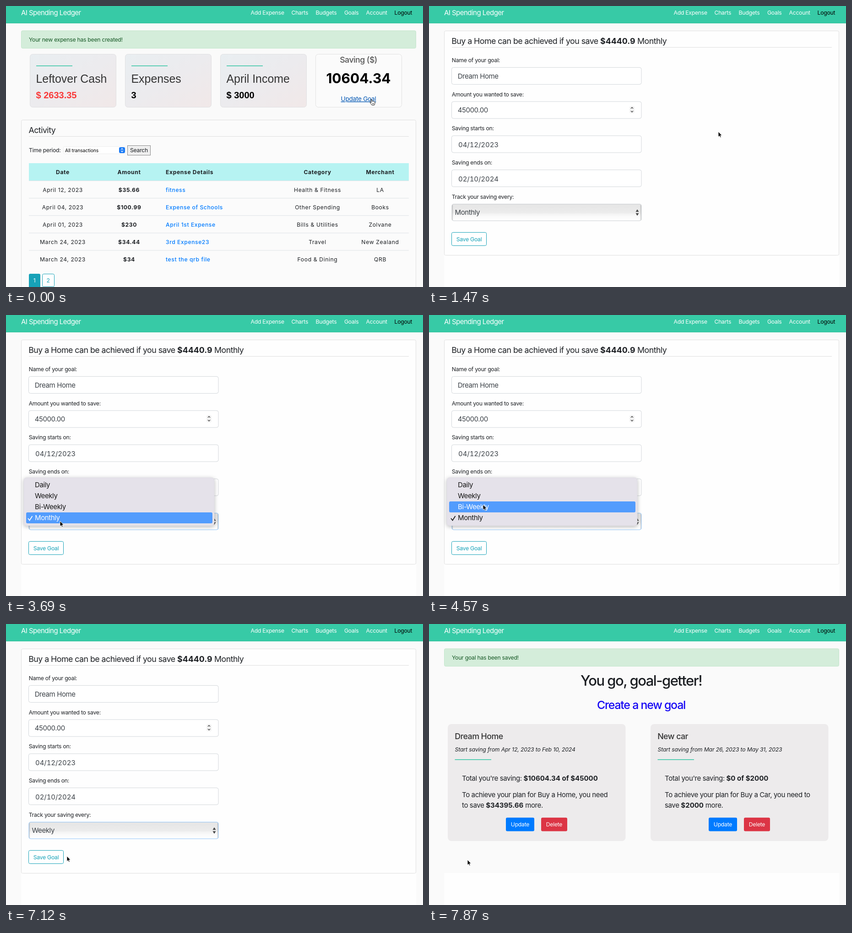
These frames come from a looping animation (911x615 px, 8000 ms). An HTML page:

```html
<!DOCTYPE html>
<html lang="en">
<head>
<meta charset="utf-8">
<title>Expense tracker</title>
<style>
  html, body { margin: 0; width: 100%; height: 100%; overflow: hidden; background: #fafafa; }
  svg { display: block; width: 911px; height: 615px; }
  text { font: 12.2px Inter, sans-serif; letter-spacing: -.02em; fill: #1c1f23; white-space: pre; }
  .bold { font-weight: 700; letter-spacing: 0; }
  .mid { text-anchor: middle; }
  .white { fill: #fff; }
  .head { font-size: 17.8px; letter-spacing: -.03em; }
  .medium { font-weight: 550; }
  .field { font-size: 15px; letter-spacing: -.027em; fill: #3b4147; }
  .date { font-size: 14.9px; letter-spacing: 0; font-variant-numeric: tabular-nums; fill: #3b4147; }
  .body { font-size: 15px; letter-spacing: -.025em; }
  .cell { letter-spacing: .6px; }
  .link { fill: #007bff; font-weight: 500; letter-spacing: .55px; }
  .alert { fill: #155724; }
  .teal { fill: #17a2b8; }
  .card { font: 24.9px "Liberation Sans", Arial, sans-serif; letter-spacing: 0; fill: #343434; }
  .value { font: bold 20px "Liberation Sans", Arial, sans-serif; letter-spacing: 0; fill: #000; }
</style>
</head>
<body>
<svg id="stage" viewBox="0 0 911 615">
  <defs>
    <linearGradient id="cardFill" x2="1" y2="1">
      <stop stop-color="#e9eef1"/><stop offset=".5" stop-color="#ecebee"/><stop offset="1" stop-color="#f1e8e8"/>
    </linearGradient>
    <linearGradient id="selectFill" x2="0" y2="1">
      <stop stop-color="#e5e5e5"/><stop offset=".52" stop-color="#ececec"/>
      <stop offset=".6" stop-color="#f4f4f4"/><stop offset=".75" stop-color="#fafafa"/><stop offset="1" stop-color="#fff"/>
    </linearGradient>
    <filter id="shadow" x="-5%" y="-15%" width="110%" height="135%">
      <feDropShadow dx="0" dy="2" stdDeviation="4" flood-opacity=".28"/>
    </filter>
  </defs>
</svg>
<script>
const LOOP = 8000;
const GREEN = '#2fc4a2', TEAL = '#17a2b8';
const stage = document.getElementById('stage');

const text = (x, y, str, cls = '', attrs = '') =>
  `<text x="${x}" y="${y}" class="${cls}" ${attrs}>${str.replace(/&/g, '&amp;')}</text>`;
const bold = str => `<tspan class="bold">${str}</tspan>`;
const box = (x, y, w, h, r, fill, stroke = 'none', attrs = '') =>
  `<rect x="${x}" y="${y}" width="${w}" height="${h}" rx="${r}" fill="${fill}" stroke="${stroke}" ${attrs}/>`;
const line = (x, y, w, color, weight = 1) =>
  `<path d="M${x} ${y}h${w}" stroke="${color}" stroke-width="${weight}"/>`;
const group = (id, content) => `<g id="${id}">${content}</g>`;
const alertBar = str => box(33.5, 54, 862, 38.5, 3, '#d4edda', '#c3e6cb') + text(50, 78, str, 'alert');
const chevrons = (x, y, w, gap, color) =>
  `<path d="M${x - w} ${y - gap}l${w} ${-w} ${w} ${w}m${-2 * w} ${2 * gap}l${w} ${w} ${w} ${-w}" fill="none" stroke="${color}" stroke-width="1.3"/>`;

function navBar() {
  const links = [[534.5, 'Add Expense'], [623.5, 'Charts'], [676.5, 'Budgets'], [739, 'Goals'], [786.5, 'Account']];
  return box(0, 0, 911, 38, 0, '#37caa6') + line(0, 37.5, 911, '#34c29f') +
    text(33, 20, 'AI Spending Ledger', 'white', 'style="font-size:15px;letter-spacing:-.035em"') +
    links.map(([x, label]) => text(x, 19.2, label, 'white')).join('') +
    text(848.5, 19.2, 'Logout', '', 'style="fill:#000"');
}

function summaryCard(x, title, value, color = '#000') {
  return box(x + .5, 105.5, 188, 116, 6, 'url(#cardFill)', '#e0e0e2') +
    line(x + 14, 131, 79, GREEN, 1.5) +
    text(x + 13.5, 168, title, 'card') +
    text(x + 13.5, 202, value, 'value', `style="fill:${color}"`);
}

function tableRow(y, [date, amount, details, category, merchant], header) {
  const weight = header ? 'cell bold' : 'cell', spacing = 'style="letter-spacing:.6px"';
  return text(124, y, date, weight + ' mid', spacing) +
    text(269, y, amount, 'cell bold mid', spacing) +
    text(349, y, details, header ? weight : 'link', header ? spacing : '') +
    text(680.5, y, category, weight + ' mid', spacing) +
    text(817.5, y, merchant, weight + ' mid', spacing);
}

function dashboard() {
  const rows = [
    ['April 12, 2023', '$35.66', 'fitness', 'Health & Fitness', 'LA'],
    ['April 04, 2023', '$100.99', 'Expense of Schools', 'Other Spending', 'Books'],
    ['April 01, 2023', '$230', 'April 1st Expense', 'Bills & Utilities', 'Zolvane'],
    ['March 24, 2023', '$34.44', '3rd Expense23', 'Travel', 'New Zealand'],
    ['March 24, 2023', '$34', 'test the qrb file', 'Food & Dining', 'QRB'],
  ];
  return alertBar('Your new expense has been created!') +
    summaryCard(52, 'Leftover Cash', '$ 2633.35', '#f93a3a') +
    summaryCard(260, 'Expenses', '3') +
    summaryCard(468, 'April Income', '$ 3000') +
    box(676.5, 105.5, 188, 116, 6, '#fbfbfb', '#e2e2e2') +
    text(770, 123.5, 'Saving ($)', 'head medium mid', 'style="fill:#555"') +
    text(770, 168.5, '10604.34', 'bold mid', 'style="font-size:30px;fill:#000"') +
    text(770, 208, 'Update Goal', 'mid', 'style="font-size:13.6px;fill:#0056b3;text-decoration:underline"') +
    box(33.5, 249.5, 862, 380, 3, '#fbfbfb', '#dfdfdf') +
    text(49.5, 278, 'Activity', 'head') + line(50, 285.5, 830, '#dedede') +
    text(50, 320, 'Time period:') +
    box(125.5, 307.5, 136, 16, 3, '#fff', '#eee') +
    text(129, 320, 'All transactions', '', 'style="font-size:10.3px;letter-spacing:-.01em;fill:#000"') +
    box(247, 309, 13, 13, 3, '#1a7af5') + chevrons(253.5, 315.5, 2.3, 1.3, '#fff') +
    box(265.5, 305.5, 50, 21, 0, '#efefef', '#8a8a8a') + text(290.5, 320, 'Search', 'mid') +
    box(50, 344, 830, 38.5, 0, '#b6f3f2') +
    tableRow(367.5, ['Date', 'Amount', 'Expense Details', 'Category', 'Merchant'], true) +
    rows.map((row, i) => line(50, 382.5 + 38.1 * i, 830, '#dee2e6') + tableRow(406.5 + 38 * i, row)).join('') +
    box(50, 586, 25, 32, 3, TEAL) + text(62, 605, '1', 'mid white') +
    box(79.5, 586.5, 26, 28, 3, '#fff', TEAL) + text(92, 605, '2', 'mid teal');
}

function goalForm() {
  const field = (i, label, value, cls) => {
    const [x, y] = cls === 'date' ? [64, 159.7] : [62.7, 158.7];
    return text(49.7, 123 + 74.7 * i, label) +
      box(49.5, 134.5 + 74.7 * i, 414.5, 37, 4, '#fff', '#d3d7db') +
      text(x, y + 74.7 * i, value, cls);
  };
  return box(33, 545, 863, 70, 0, '#fefefe') +
    box(33.5, 54.5, 862, 491, 3, '#fefefe', '#dfdfdf') +
    text(49.2, 83, `Buy a Home can be achieved if you save ${bold('$4440.9')} Monthly`, 'head') +
    line(50, 90.5, 830, '#dedede') +
    field(0, 'Name of your goal:', 'Dream Home', 'field') +
    field(1, 'Amount you wanted to save:', '45000.00', 'field') +
    box(438, 219, 11, 16, 4, '#f3f3f3') + chevrons(443.5, 227, 2.5, 2.6, '#333') +
    field(2, 'Saving starts on:', '04/12/2023', 'date') +
    field(3, 'Saving ends on:', '02/10/2024', 'date') +
    text(49.7, 422, 'Track your saving every:') +
    box(50, 433.5, 414, 36.5, 4, 'url(#selectFill)', '#c9cdd1', 'id="select"') +
    '<path d="M51.3 436v32M462.6 436v32" stroke="#000" stroke-opacity=".13" stroke-width="2"/>' +
    '<path d="M451.5 450.5l3.5-5.5 3.5 5.5zm0 3l3.5 5.5 3.5-5.5z" fill="#444"/>' +
    text(56.5, 457.3, 'Monthly', 'field', 'id="choice"') +
    box(49.5, 495.5, 76, 29, 3, '#fff', TEAL, 'id="save"') +
    text(87.5, 515, 'Save Goal', 'mid', 'id="saveLabel"');
}

const periods = ['Daily', 'Weekly', 'Bi-Weekly', 'Monthly'];
const MENU_TOP = 360, ROW = 24;
function menu() {
  return box(39, 356, 416, 105, 6, '#e5e2ea', '#cfccd4', 'stroke-width=".5" filter="url(#shadow)"') +
    box(44, 0, 407, ROW, 3, '#529cfd', 'none', 'id="highlight"') +
    periods.map((name, i) => text(63, 377 + ROW * i, name, 'field option')).join('') +
    '<path id="check" d="M48 445l3.5 4.5 6-9.5" fill="none" stroke-width="1.8"/>';
}

function goalCard(x, name, dates, total, plan, rest) {
  const button = (bx, w, label, color) =>
    box(bx, 423.7, w, 29.8, 3, color) + text(bx + w / 2, 443, label, 'mid white');
  return `<g transform="translate(${x})">` +
    box(0, 219, 388.5, 256, 8, '#edebec') +
    text(15.2, 252, name, 'head medium', 'style="fill:#333"') +
    text(15.5, 279, `Start saving from ${dates}`, '', 'style="font-style:italic;letter-spacing:-.01em"') +
    line(15.5, 296.8, 79.5, GREEN, 1.6) +
    text(31, 343, `Total you're saving: ${bold(total)}`, 'body') +
    text(31, 379, plan, 'body') + text(31, 402, rest, 'body') +
    button(127, 62, 'Update', '#007bff') + button(204, 57, 'Delete', '#dc3545') + '</g>';
}

function goalList() {
  return box(33, 545, 863, 70, 0, '#fefefe') +
    alertBar('Your goal has been saved!') +
    text(463.5, 135, 'You go, goal-getter!', 'medium mid', 'style="font-size:31px;letter-spacing:-.049em"') +
    text(463.5, 186, 'Create a new goal', 'medium mid', 'style="font-size:24.8px;letter-spacing:-.048em;fill:#1404f4"') +
    goalCard(41, 'Dream Home', 'Apr 12, 2023 to Feb 10, 2024', '$10604.34 of $45000',
      'To achieve your plan for Buy a Home, you need', `to save ${bold('$34395.66')} more.`) +
    goalCard(484, 'New car', 'Mar 26, 2023 to May 31, 2023', '$0 of $2000',
      'To achieve your plan for Buy a Car, you need to', `save ${bold('$2000')} more.`);
}

const arrow = '<path id="arrow" d="M0 0V11.5L2.7 9.2 4.4 13 6.3 12.2 4.6 8.5H8Z" stroke="#fff" stroke-width=".9"/>';
const hand = '<path id="hand" d="M2 1.5q1.2-1 2 .5l1 3.5q1.5-1 2.3.3 1.5-.6 2.1.6 1.6-.2 1.6 1.4v2.7l-1.5 3.5H4.5L.3 8.5q-.3-1.5 1.2-1.2l1.5 1.2zM6 9.5v2.5m2-2.5v2.5" fill="#fff" stroke="#000" stroke-width=".9"/>';

stage.insertAdjacentHTML('beforeend', navBar() + group('dashboard', dashboard()) + group('form', goalForm()) +
  group('menu', menu()) + group('goals', goalList()) + group('cursor', arrow + hand));

const el = id => document.getElementById(id);
const show = (id, on) => { el(id).style.display = on ? '' : 'none'; };
const options = document.querySelectorAll('.option');

// Pointer moves: first step, last step, number of steps, end x, end y.
const moves = [
  [440, 880, 4, 631, 273], [1320, 1470, 2, 632, 275],
  [1760, 2060, 3, 400, 236], [2210, 2500, 3, 171, 292], [2800, 2800, 1, 172, 295],
  [2950, 3540, 5, 118, 451], [4280, 4570, 3, 118, 415], [4720, 4870, 2, 117, 401],
  [5770, 6070, 3, 164, 504], [6520, 6670, 2, 163, 504],
  [7120, 7120, 1, 133, 508], [7270, 7420, 2, 84, 516],
];

function pointerAt(t) {
  let x = 795, y = 203;
  for (const [start, end, steps, toX, toY] of moves) {
    if (t < start) break;
    const interval = (end - start) / (steps - 1) || 1;
    const p = Math.min(1, (Math.floor((t - start) / interval) + 1) / steps);
    const eased = p * p * (3 - 2 * p);
    x += (toX - x) * eased;
    y += (toY - y) * eased;
  }
  return [x, y];
}

function render(t) {
  const [x, y] = pointerAt(t);
  show('dashboard', t < 140);
  show('form', t >= 140 && t < 7720);
  show('goals', t >= 7720);

  show('menu', t >= 3680 && t < 5770);
  el('menu').style.opacity = t < 5620 ? 1 : .4;
  const active = Math.max(0, Math.min(3, Math.floor((y - MENU_TOP) / ROW)));
  el('highlight').setAttribute('y', MENU_TOP + ROW * active);
  options.forEach((option, i) => { option.style.fill = i === active ? '#fff' : '#161616'; });
  el('check').setAttribute('stroke', active === 3 ? '#fff' : '#161616');

  el('select').setAttribute('stroke', t < 3540 ? '#c9cdd1' : '#8fc3f7');
  el('choice').textContent = periods[t < 5770 ? 3 : 1];

  const onSave = t < 7720 && x > 49 && x < 125 && y > 495 && y < 525;
  el('save').setAttribute('fill', onSave ? TEAL : '#fff');
  el('saveLabel').style.fill = onSave ? '#fff' : TEAL;

  const pointing = t < 140 || onSave;
  show('hand', pointing);
  show('arrow', !pointing);
  el('cursor').setAttribute('transform', `translate(${x} ${y})`);
}

function tick() {
  render(performance.now() % LOOP);
  requestAnimationFrame(tick);
}
tick();
</script>
</body>
</html>
```
